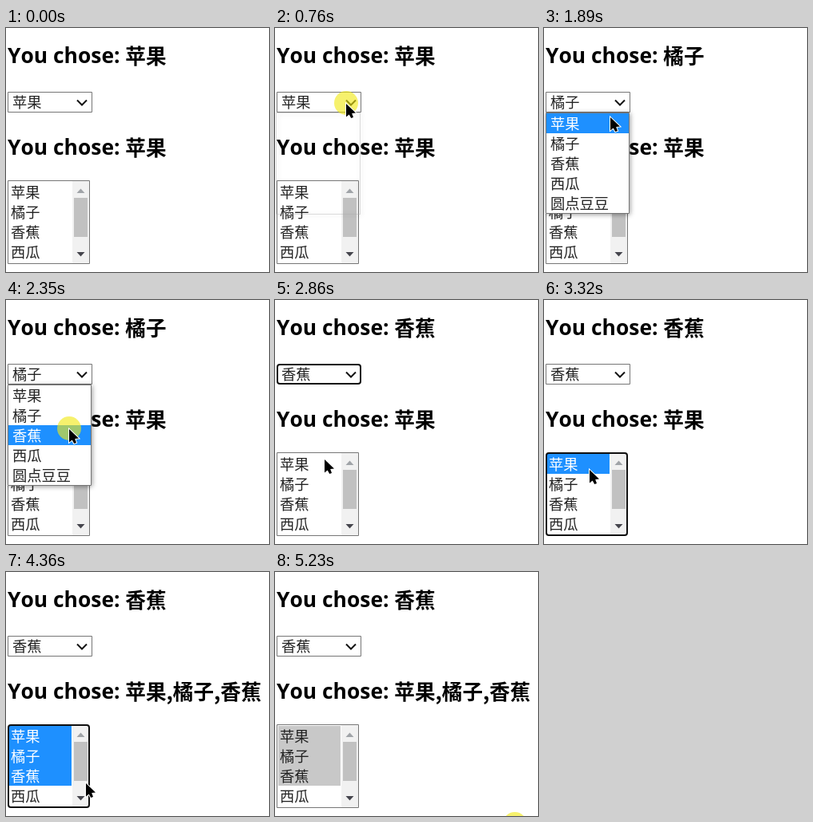
Write an HTML page with a canvas that moves like this. It is 329 px wide and 306 px high and loops after 5.33 s.

```html
<!DOCTYPE html>
<html lang="zh-CN">
<head>
<meta charset="utf-8">
<title>Select demo</title>
<style>
html, body { margin: 0; height: 100%; overflow: hidden; background: #fff; }
canvas { display: block; }
</style>
</head>
<body>
<canvas width="329" height="306"></canvas>
<script>
const LOOP = 5330, ROW = 25, BLUE = '#1e90ff';
const CJK = '"Noto Sans CJK SC", "Noto Sans CJK", sans-serif';
const fruits = ['苹果', '橘子', '香蕉', '西瓜', '圆点豆豆'];
const ctx = document.querySelector('canvas').getContext('2d');
const arrow = new Path2D('M0 0V16.5L3.7 13.5 6.2 18 9 17 7.2 12 12 11.5Z');

// Pointer path: time, x, y
const path = [
  [230, 286, 300], [280, 250, 258], [340, 183, 205], [420, 128, 140], [520, 92, 99],
  [620, 89, 95], [800, 89, 95], [1180, 83, 140], [1340, 83, 140], [1590, 88, 95],
  [1690, 88, 97], [1790, 84, 104], [1890, 83, 112], [2260, 79, 162], [2680, 79, 162],
  [2860, 62, 200], [2990, 62, 200], [3190, 57, 213], [3500, 57, 213], [3620, 62, 233],
  [3720, 62, 234], [3860, 67, 254], [4240, 67, 254], [4400, 110, 268], [4630, 275, 310],
  [5229, 300, 340], [5230, 300, 317], [5330, 300, 317]
];
const presses = [[680, 820], [1200, 1340], [1620, 1740], [2290, 2450], [3190, 3300],
  [3620, 3720], [4060, 4140], [5230, 5330]];
const within = (t, spans) => spans.some(([a, b]) => t >= a && t < b);

function pointerAt(t) {
  const i = path.findIndex(p => p[0] > t);
  if (i < 1) return null;
  const [a, x0, y0] = path[i - 1], [b, x1, y1] = path[i], k = (t - a) / (b - a);
  return [x0 + (x1 - x0) * k, y0 + (y1 - y0) * k];
}

function box(x, y, w, h, fill) {
  ctx.fillStyle = fill;
  ctx.fillRect(x, y, w, h);
}

function text(str, x, y, font, fill) {
  ctx.font = font;
  ctx.fillStyle = fill;
  ctx.fillText(str, x, y);
}

const option = (str, x, mid, fill = '#222') => text(str, x, mid + 6.8, '18.3px ' + CJK, fill);

function heading(values, y) {
  text('You chose:', 2, y, 'bold 26.4px "Open Sans", sans-serif', '#000');
  text(values, 149.3, y + .6, 'bold 25.6px ' + CJK, '#000');
}

function line(points, color, width) {
  ctx.beginPath();
  points.forEach(p => ctx.lineTo(...p));
  ctx.strokeStyle = color;
  ctx.lineWidth = width;
  ctx.stroke();
}

function triangle(x, y, dy, fill) {
  ctx.beginPath();
  ctx.moveTo(x - 5, y);
  ctx.lineTo(x + 5, y);
  ctx.lineTo(x, y + dy);
  ctx.fillStyle = fill;
  ctx.fill();
}

function frame(x, y, w, h, focused) {
  const d = focused ? 1 : .5;
  ctx.beginPath();
  ctx.roundRect(x + d, y + d, w - 2 * d, h - 2 * d, focused ? 3 : 0);
  ctx.lineWidth = 2 * d;
  ctx.strokeStyle = focused ? '#101010' : '#767676';
  ctx.stroke();
}

function dropdown(value, focused) {
  frame(2, 80, 106, 26, focused);
  option(value, 8, 93);
  line([[89, 90.5], [95, 96.5], [101, 90.5]], '#111', 2);
}

function listbox(count, focused) {
  for (let i = 0; i < 4; i++) {
    const on = i < count, y = 193 + i * ROW;
    if (on) box(4, y, 78, ROW, focused ? BLUE : '#c8c8c8');
    option(fruits[i], 6, y + 13, on && focused ? '#fff' : '#222');
  }
  box(83, 192, 21, 103, '#f1f1f1');
  box(85, 213, 17, 49, '#c1c1c1');
  triangle(93.5, 207, -5.5, '#a0a4a8');
  triangle(93.5, 281, 5.5, '#45454d');
  frame(2, 191, 103, 105, focused);
}

function popup(hover, opening) {
  ctx.save();
  ctx.shadowColor = 'rgba(0,0,0,.4)';
  ctx.shadowBlur = 6;
  ctx.shadowOffsetX = ctx.shadowOffsetY = 1;
  if (opening) {
    ctx.globalAlpha = .4;
    ctx.strokeStyle = '#aaa';
    ctx.lineWidth = 1;
    ctx.strokeRect(1.5, 106.5, 105, 127);
    ctx.restore();
    return;
  }
  box(2, 106, 105, 127, '#fff');
  ctx.restore();
  fruits.forEach((name, i) => {
    const y = 107 + i * ROW;
    if (i === hover) box(3, y, 103, ROW, BLUE);
    option(name, 8, y + 13, i === hover ? '#fff' : '#222');
  });
  frame(2, 106, 105, 127);
}

function pointer([x, y], pressed, beam) {
  if (pressed) {
    ctx.beginPath();
    ctx.arc(x, y - 1, 15, 0, 7);
    ctx.fillStyle = 'rgba(240,232,20,.62)';
    ctx.fill();
  }
  ctx.save();
  ctx.translate(Math.round(x), Math.round(y));
  if (beam) {
    for (const [color, width] of [['#fff', 3], ['#222', 1]]) {
      line([[.5, -6.5], [.5, 6.5]], color, width);
      line([[-2.5, -6.5], [3.5, -6.5]], color, width);
      line([[-2.5, 6.5], [3.5, 6.5]], color, width);
    }
  } else {
    ctx.strokeStyle = '#fff';
    ctx.lineWidth = 2;
    ctx.stroke(arrow);
    ctx.fillStyle = '#000';
    ctx.fill(arrow);
  }
  ctx.restore();
}

function draw(t) {
  const single = t < 1340 ? 0 : t < 2450 ? 1 : 2;
  const count = t < 3190 ? 0 : t < 3620 ? 1 : t < 4060 ? 2 : 3;
  const opening = within(t, [[760, 780], [1690, 1710]]);
  const open = within(t, [[780, 1340], [1710, 2450]]);
  const at = pointerAt(t);

  box(0, 0, 329, 306, '#fff');
  heading(fruits[single], 44);
  heading(fruits.slice(0, count || 1).join(), 159);
  dropdown(fruits[single], within(t, [[1340, 1690], [2450, 3190]]));
  listbox(count, within(t, [[3190, 5230]]));
  if (open || opening) {
    const hover = at[1] < 107 ? single : Math.floor((at[1] - 107) / ROW);
    popup(hover, opening);
  }
  if (at) {
    const beam = !open && at[0] < 201 && at[1] > 134 && at[1] < 168;
    pointer(at, within(t, presses), beam);
  }
}

ctx.fontKerning = 'none';
const start = performance.now();
(function tick() {
  draw((performance.now() - start) % LOOP);
  requestAnimationFrame(tick);
})();
</script>
</body>
</html>
```
